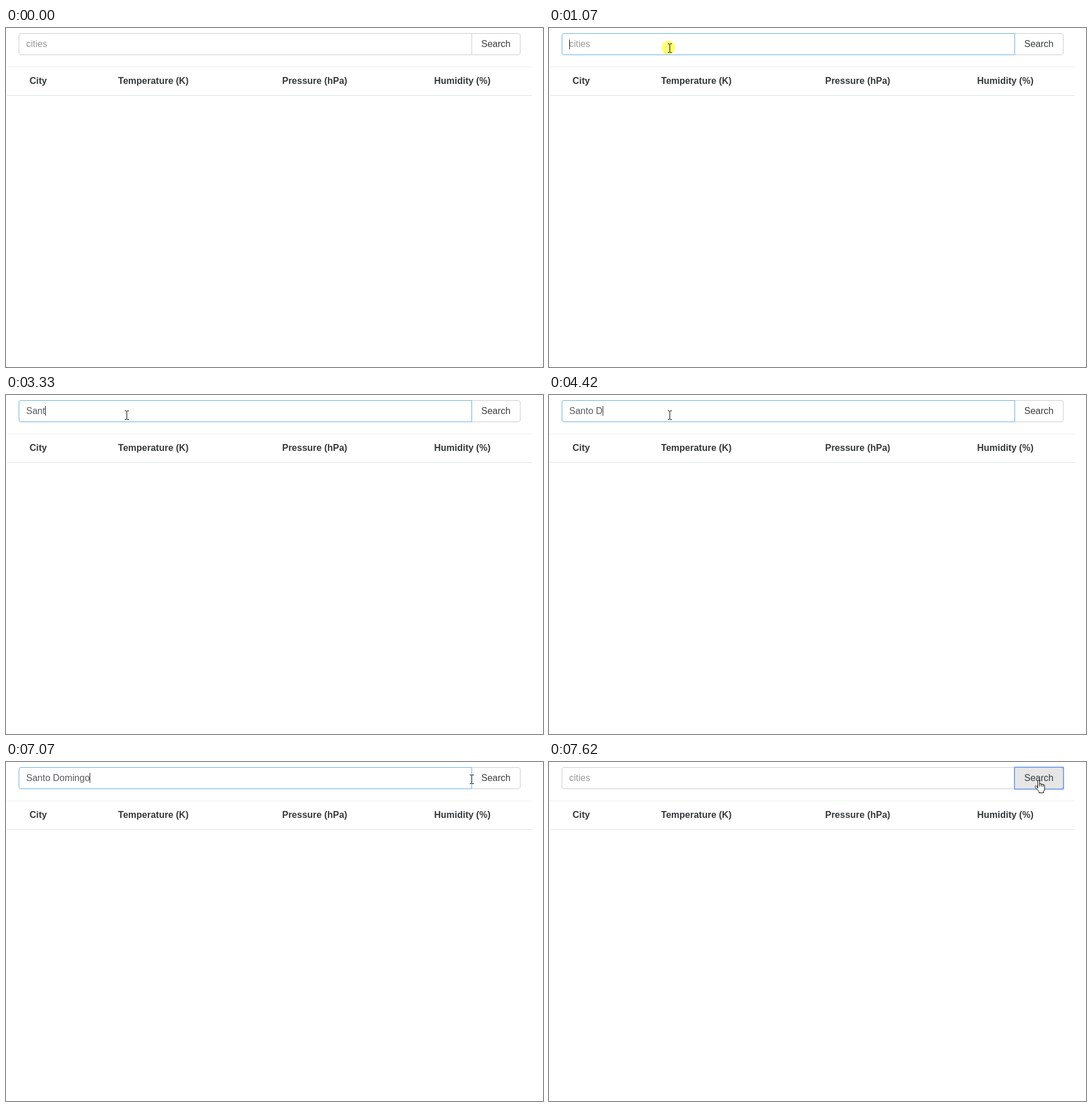
Animation of 931 by 588 pixels, one loop 8000 ms. Source, as an HTML page:

```html
<!DOCTYPE html>
<html lang="en">
<head>
<meta charset="utf-8">
<title>City weather search</title>
<style>
  html, body { margin: 0; height: 100%; overflow: hidden; background: #fff; }
  svg { display: block; }
  text { font: 16px "Liberation Sans", Arial, sans-serif; fill: #373a3c; white-space: pre; }
  .head { font-weight: bold; text-anchor: middle; }
  .pointer { stroke: #000; fill: #fff; }
</style>
</head>
<body>
<svg width="931" height="588" viewBox="0 0 931 588">
  <path fill="#eceeef" d="M2 67h910v1H2zM2 116h910v2H2z"/>
  <g class="head">
    <text class="head" x="55.8" y="97">City</text>
    <text class="head" x="255.5" y="97">Temperature (K)</text>
    <text class="head" x="535.2" y="97">Pressure (hPa)</text>
    <text class="head" x="791.1" y="97">Humidity (%)</text>
  </g>

  <path id="button" d="M807.5 9.5H888a3.5 3.5 0 0 1 3.5 3.5V43a3.5 3.5 0 0 1-3.5 3.5H807.5z"/>
  <path id="field" fill="#fff" d="M807.5 9.5V46.5H26a3.5 3.5 0 0 1-3.5-3.5V13a3.5 3.5 0 0 1 3.5-3.5z"/>
  <rect id="ring" x="807" y="9" width="85" height="38" rx="1" fill="none" stroke="#7ba6e8" stroke-width="2"/>
  <text x="824" y="33">Search</text>
  <text id="value" x="35" y="33"></text>
  <rect id="caret" width="1" height="17" fill="#222"/>

  <circle id="glow" r="12" fill="#ffff78"/>
  <g id="mouse">
    <path id="arrow" class="pointer" d="M.5.5V16.5l3.7-3.6 2.6 6 2.2-1-2.6-5.7H11.5z"/>
    <path id="beam" class="pointer" style="fill:none" d="M-3-7.5H0M1-7.5H4M.5-7V7M-3 7.5H0M1 7.5H4"/>
    <g id="hand" class="pointer" transform="translate(-7)">
      <path d="M5.5 14.5V2Q5.5.5 7 .5T8.5 2V7.5Q8.5 6.5 10 6.5T11.5 8Q11.7 7.3 13 7.3T14.5 9Q15 8.3 16 8.3T17.3 10V15Q17.3 18 15.5 20V22.5H7.5V20.5Q5 17.5 3 15L.9 12.5Q.3 11.2 1.5 10.5T4 11.5z"/>
      <path fill="none" d="M8.5 7.5V11.5M11.5 8V11.5M14.5 9V12"/>
    </g>
  </g>
</svg>
<script>
const LOOP = 8000, FOCUS = 1070, LEAVE = 6760, PRESS = 7390, CLEAR = 7540, RELEASE = 7620;
const CITY = "Santo Domingo";
const KEY_TIMES = [2230, 2480, 2930, 3330, 3650, 3870, 4420, 4720, 5040, 5270, 5500, 5680, 5820];

const $ = id => document.getElementById(id);
const show = (id, on) => $(id).setAttribute("visibility", on ? "visible" : "hidden");
const set = (id, attrs) => { for (const k in attrs) $(id).setAttribute(k, attrs[k]); };
const smooth = u => u * u * (3 - 2 * u);

function pointerAt(t) {
  if (t < 150) return null;
  if (t < LEAVE) {
    const step = Math.min(10, Math.floor((t - 150) / 77));
    if (step > 8) return step === 9 ? [204, 40] : [209, 35];
    const e = smooth(Math.sqrt(step / 8));
    return [Math.round(782 - 583 * e), Math.round(572 - 520 * e)];
  }
  const step = Math.min(6, Math.floor((t - LEAVE) / 76.5));
  const e = smooth(Math.sqrt((step + 1) / 7));
  return [Math.floor(209 + 640 * e), t < PRESS ? Math.round(35 - 5 * e) : 31];
}

function draw(t) {
  const focused = t >= FOCUS && t < PRESS;
  const typed = t < CLEAR ? KEY_TIMES.filter(k => k <= t).length : 0;
  const value = $("value");
  value.textContent = typed ? CITY.slice(0, typed) : "cities";
  value.style.fill = typed ? "#55595c" : "#999";
  set("field", { stroke: focused ? "#66afe9" : "#ccc" });

  const lastEdit = typed ? KEY_TIMES[typed - 1] : FOCUS;
  show("caret", focused && (t - lastEdit) % 1100 < 550);
  set("caret", {
    x: typed ? Math.round(35 + value.getComputedTextLength()) : 35,
    y: typed ? 19 : 20
  });

  const pos = pointerAt(t);
  const onButton = !!pos && t >= LEAVE && pos[0] > 807;
  const onField = !!pos && !onButton && pos[1] < 47;
  set("button", { fill: onButton ? "#e6e6e6" : "#fff", stroke: onButton ? "#adadad" : "#ccc" });
  show("ring", t >= PRESS);
  show("arrow", pos && !onButton && !onField);
  show("beam", onField);
  show("hand", onButton);
  show("glow", (t >= FOCUS && t < 1220) || (t >= PRESS && t < RELEASE));
  if (pos) {
    set("mouse", { transform: `translate(${pos})` });
    set("glow", { cx: pos[0] - 2, cy: pos[1] - 1 });
  }
}

function frame() {
  draw(performance.now() % LOOP);
  requestAnimationFrame(frame);
}
frame();
</script>
</body>
</html>
```
